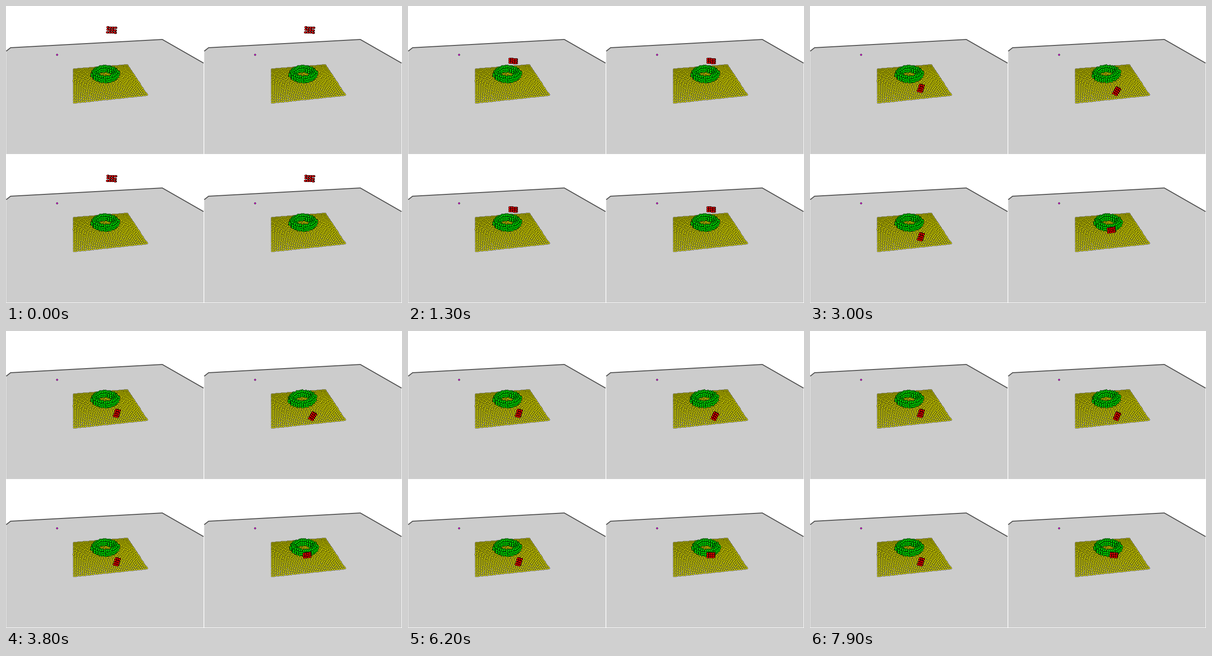
These frames come from a looping animation (864x648 px, 8000 ms). A matplotlib script:

```python
import numpy as np
import matplotlib.pyplot as plt
from matplotlib.animation import FuncAnimation

W, H, FRAMES, STEP = 864, 648, 80, 100
PANELS = [(0, 0), (432, 0), (0, 324), (432, 324)]
YAW, TILT = np.radians(11), np.arcsin(0.48)
START, HIT = np.array([230, 52]), 1.4

# Where each box comes to rest: x, y, angle, sliding time, rocking in x and angle
LEFT = (241.5, 179, -72, 1.4, 0, 0)
BOXES = [LEFT, (237, 185.5, -62, 1.1, 0.5, -4), LEFT,
         (227.5, 164.5, -2, 1.1, 3, 6)]
# How far each ring is pushed: x, y, roll
RINGS = [(0, 0, 0), (-2, -0.5, -4), (0, 0, 0), (2, 0, 2)]


def turn(x, y, deg):
    c, s = np.cos(np.radians(deg)), np.sin(np.radians(deg))
    return c * x - s * y, s * x + c * y


def ease_out(t, start, span):
    return 1 - (1 - np.clip((t - start) / span, 0, 1)) ** 1.8


def sheet(cols=40, rows=27):
    """Lattice seen in perspective, far rows first."""
    far_l, far_r, near_r, near_l = np.array(
        [(147.5, 138), (264, 129), (306.8, 193.3), (147.5, 210.3)])
    # Projective map of the unit square onto the four corners
    bend = far_l - far_r + near_r - near_l
    g, h = np.linalg.solve(np.array([far_r - near_r, near_l - near_r]).T, bend)
    v, u = np.meshgrid(np.linspace(0, 1, rows), np.linspace(0, 1, cols),
                       indexing="ij")
    u, v = u.reshape(-1, 1), v.reshape(-1, 1)
    right = far_r * (1 + g) - far_l
    down = near_l * (1 + h) - far_l
    return ((right * u + down * v + far_l) / (1 + g * u + h * v)).T


def ring(big=23.4, small=7.2, gap=4):
    """Torus filled with a cubic lattice, sorted far to near."""
    n = (np.arange(-8, 8) + 0.5) * gap
    x, y, z = (g.ravel() for g in np.meshgrid(n, n, n))
    keep = (np.hypot(x, y) - big) ** 2 + z ** 2 < small ** 2
    x, away = turn(x[keep], y[keep], np.degrees(YAW))
    z = z[keep]
    order = np.argsort(z * np.sin(TILT) - away * np.cos(TILT))
    return x[order], -away[order] * np.sin(TILT), -z[order] * np.cos(TILT)


SHEET = sheet()
RING = ring()
DEPTH, ROW, COL = (g.ravel() for g in np.meshgrid(
    [1, 0, -1], [1, 0, -1], np.arange(4) - 1.5, indexing="ij"))


def box_points(goal, t):
    gx, gy, angle, span, rock, tilt = goal
    fall = START + np.array([-1, 67.5]) * (min(t, HIT) / 1.3) ** 1.65
    slide = ease_out(t, HIT, span)
    sway = -slide * np.cos(np.pi * (t - 3.7) / 4.2)
    x, y = fall + (np.array([gx, gy]) - fall) * slide
    loose = np.exp(-t / 0.6)
    u, v = turn(COL * (4.4 + 1.1 * loose), ROW * (3.8 + 1.5 * loose),
                4 + (angle - 4) * slide + tilt * sway)
    return (x + rock * sway + u + DEPTH * (1.1 - 0.5 * slide),
            y + v - DEPTH * 0.6 * slide)


def ring_points(push, t):
    dx, dy, roll = np.array(push) * ease_out(t, 1.6, 1.2)
    bulge = np.exp(-((t - 2.1) / 0.35) ** 2)
    u, v = turn(RING[0], RING[1] + RING[2] * (1 + 0.05 * bulge), roll)
    return 216 + dx + u, 148 + dy - 0.8 * bulge + v


fig = plt.figure(figsize=(W / 72, H / 72), dpi=72, facecolor="white")
ax = fig.add_axes([0, 0, 1, 1])
ax.set_xlim(0, W)
ax.set_ylim(H, 0)
ax.axis("off")


def dots(color, size, x=(), y=()):
    return ax.plot(x, y, "o", ms=size, mfc=color, mec="black", mew=0.65)[0]


ring_dots, box_dots = [], []
for ox, oy in PANELS:
    edge = np.array([(0.5, 98.5), (10, 91), (341, 73), (431, 124.5)]) + (ox, oy)
    base = np.array([(431, 323), (0.5, 323)]) + (ox, oy)
    ax.fill(*np.vstack([edge, base]).T, color="#cccccc", lw=0)
    ax.plot(*edge.T, color="#505050", lw=2, solid_capstyle="butt")
    dots("#ff00ff", 3.4, [ox + 110.5], [oy + 105.5])
    dots("#ffff00", 3.6, SHEET[0] + ox, SHEET[1] + oy)
    ring_dots.append(dots("#00e600", 4.2))
    box_dots.append(dots("#f00000", 4.1))


def update(i):
    t = i * STEP / 1000
    for k, (ox, oy) in enumerate(PANELS):
        x, y = ring_points(RINGS[k], t)
        ring_dots[k].set_data(x + ox, y + oy)
        x, y = box_points(BOXES[k], t)
        box_dots[k].set_data(x + ox, y + oy)
    return ring_dots + box_dots


anim = FuncAnimation(fig, update, frames=FRAMES, interval=STEP, repeat=True,
                     repeat_delay=0, blit=False)
plt.show()
```
